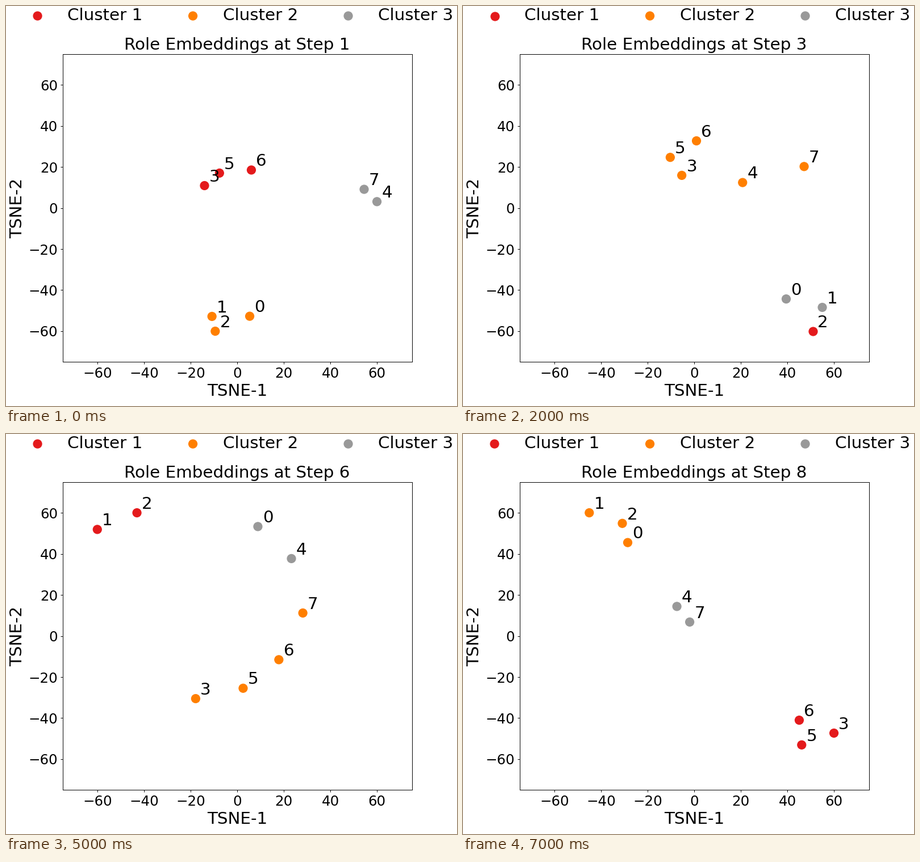
Animation of 794x706 px, one loop 8 s. Source, as a matplotlib script:

```python
import numpy as np
import matplotlib.pyplot as plt
from matplotlib.animation import FuncAnimation
from matplotlib.transforms import IdentityTransform

W, H, DPI = 794, 706, 88.2
RED, ORANGE, GREY = COLORS = ("#e41a1c", "#ff7f00", "#999999")
DOT = 150
EM = 24 * DPI / 72
LEGEND_X, LEGEND_STEP = 55.55, 273.5


def chain(color, roles, start, end, bend=0):
    """Space roles evenly along a bent line in the complex plane."""
    t = np.linspace(0, 1, len(roles))
    spots = start + (end - start) * (t + 4 * t * (1 - t) * bend)
    return {role: (z, color) for role, z in zip(roles, spots)}


def spin(layout, center, factor):
    """Turn and scale a layout about a center."""
    return {role: (center + (z - center) * factor, color)
            for role, (z, color) in layout.items()}


first = (chain(RED, "356", -14 + 10.9j, 6.1 + 18.5j, -.12 + .16j)
         | chain(ORANGE, "102", -10.8 - 52.8j, -9.4 - 60j, -.09 + 2.17j)
         | chain(GREY, "47", 60 + 3.1j, 54.5 + 9.1j))
second = spin(first, 0, 0.9 * np.exp(-1j * np.pi / 8))
third = (chain(RED, "2", 51 - 60j, 51 - 60j)
         | chain(ORANGE, "653", 1 + 32.7j, -5.3 + 15.9j, .14 - .43j)
         | chain(ORANGE, "47", 20.8 + 12.4j, 47.2 + 20.2j)
         | chain(GREY, "01", 39.5 - 44.3j, 55 - 48.4j))
fourth = (chain(RED, "67", -48.3 - 52.2j, -60 - 60j)
          | chain(ORANGE, "02", 49.6 + 22.2j, 39 + 30.2j)
          | chain(GREY, "13", -2.1 - 3.2j, -12.4 - 31j)
          | chain(GREY, "45", -1.3 - 40.6j, -29.8 - 41j))
fifth = spin(fourth, -60 - 60j, 0.5)
sixth = (chain(RED, "12", -60 + 51.9j, -43 + 60j)
         | chain(ORANGE, "3567", -17.8 - 30.5j, 28.2 + 11.2j, -.04 - .18j)
         | chain(GREY, "04", 8.9 + 53.3j, 23.3 + 37.7j))
seventh = (chain(RED, "356", 54.7 + 60j, 40.7 + 24.1j, .07 + .07j)
           | chain(ORANGE, "120", -60 - 45.3j, -36.5 - 40.4j, -.06 - .03j)
           | chain(GREY, "47", -3.3 - 27.5j, 6.8 - 20.6j))
eighth = (chain(RED, "356", 60 - 47.3j, 45.1 - 41j, .15 + .66j)
          | chain(ORANGE, "120", -45 + 60j, -28.5 + 45.5j, .14 + .25j)
          | chain(GREY, "47", -7.4 + 14.4j, -1.9 + 6.8j))
STEPS = [first, second, third, fourth, fifth, sixth, seventh, eighth]

plt.rcParams.update({"font.family": "DejaVu Sans", "font.size": 24,
                     "axes.titlesize": 24, "axes.labelsize": 24,
                     "xtick.labelsize": 20, "ytick.labelsize": 20})

# The small surplus keeps the pixel size from being rounded down.
fig, ax = plt.subplots(figsize=((W + 0.01) / DPI, (H + 0.01) / DPI), dpi=DPI)
fig.subplots_adjust(left=0.1255)


def draw_legend_entry(k, color, count):
    x = LEGEND_X + k * LEGEND_STEP
    pixels = IdentityTransform()
    dot = ax.scatter([x], [H - 17.5], s=DOT, transform=pixels, clip_on=False)
    # A lone color lets the renderer snap the dot to whole pixels.
    dot.set_facecolor([color] * count)
    ax.text(x + 1.8 * EM, H - 25.2, f"Cluster {k + 1}", transform=pixels)


def draw_step(i):
    ax.clear()
    layout = STEPS[i]
    for k, color in enumerate(COLORS):
        group = np.array([z for z, c in layout.values() if c == color])
        ax.scatter(group.real, group.imag, s=DOT, c=[color] * len(group))
        draw_legend_entry(k, color, len(group))
    for role, (z, _) in layout.items():
        ax.text(z.real + 2, z.imag + 2, role)
    ticks = range(-60, 61, 20)
    ax.set(xlim=(-74.9, 75), ylim=(-75, 75), xticks=ticks, yticks=ticks,
           xlabel="TSNE-1", ylabel="TSNE-2")
    ax.set_title(f"Role Embeddings at Step {i + 1}")
    return []


anim = FuncAnimation(fig, draw_step, frames=len(STEPS), interval=1000,
                     init_func=lambda: draw_step(0), repeat=True)
plt.show()
```
